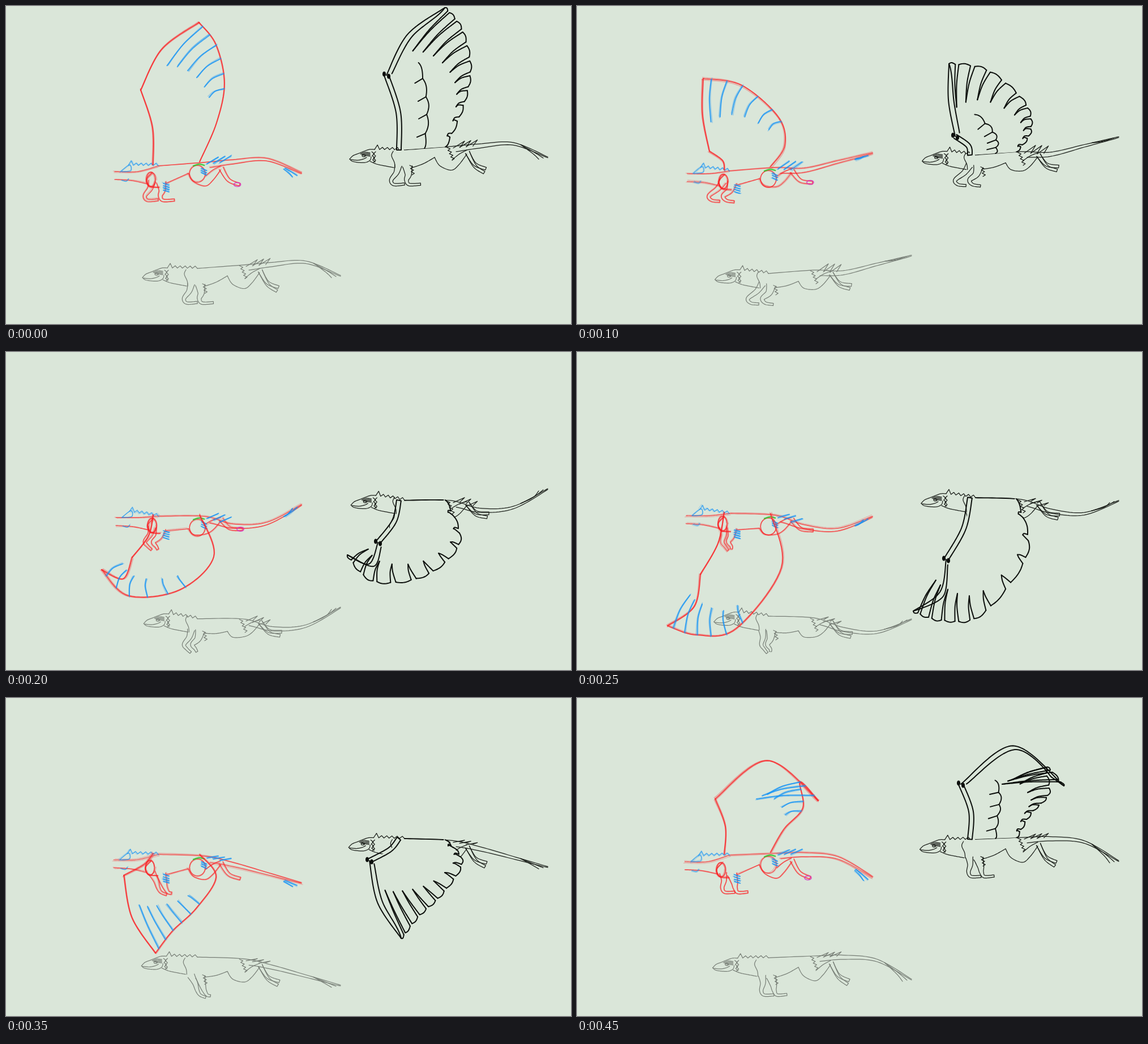
These frames come from a looping animation (998 by 561 pixels, 500 ms). An HTML page with a canvas:

```html
<!DOCTYPE html>
<html lang="en">
<head>
<meta charset="utf-8">
<title>Flight cycle</title>
<style>
html, body { margin: 0; width: 100%; height: 100%; overflow: hidden; background: #dae6d9; }
canvas { display: block; }
</style>
</head>
<body>
<canvas id="stage" width="998" height="561"></canvas>
<script>
const ctx = document.getElementById('stage').getContext('2d');
const PAPER = '#dae6d9', INK = '#0b0e0b', RED = '#fa1f24', BLUE = '#1593f5';
const STEP = 50, COUNT = 10, SAMPLES = 48;

// ---- geometry ----
const mix = (a, b, t) => Array.isArray(a) ? a.map((v, i) => mix(v, b[i], t)) : a + (b - a) * t;
const add = ([x, y], dx, dy) => [x + dx, y + dy];
const shift = (list, dx, dy) => list.map(s => s.map(p => add(p, dx, dy)));
const toward = (p, q, d) => mix(p, q, d / (Math.hypot(q[0] - p[0], q[1] - p[1]) || 1));

function smooth(...p) {
  const at = i => p[Math.max(0, Math.min(p.length - 1, i))];
  return Array.from({ length: SAMPLES + 1 }, (_, k) => {
    const u = k / SAMPLES * (p.length - 1), i = Math.min(p.length - 2, Math.floor(u)), t = u - i;
    return [0, 1].map(c => {
      const [a, b, d, e] = [-1, 0, 1, 2].map(n => at(i + n)[c]);
      return b + t / 2 * (d - a + t * (2 * a - 5 * b + 4 * d - e + t * (3 * (b - d) + e - a)));
    });
  });
}
function along(path, u) {
  const k = Math.max(0, Math.min(1, u)) * SAMPLES, i = Math.min(SAMPLES - 1, Math.floor(k));
  return mix(path[i], path[i + 1], k - i);
}
const part = (path, from, to, n = 10) =>
  Array.from({ length: n + 1 }, (_, k) => along(path, mix(from, to, k / n)));

// Outline of a limb that narrows from one width to another
function tube(path, wide, narrow) {
  const side = sign => path.map(([x, y], k) => {
    const a = path[Math.max(0, k - 1)], b = path[Math.min(SAMPLES, k + 1)];
    const dx = b[0] - a[0], dy = b[1] - a[1], len = Math.hypot(dx, dy) || 1;
    const w = sign / 2 * (narrow + (wide - narrow) * (1 - k / SAMPLES) ** 2);
    return [x - dy / len * w, y + dx / len * w];
  });
  return [...side(1), ...side(-1).reverse()];
}
function zigzag(from, to, n, size) {
  return Array.from({ length: n + 1 }, (_, i) => add(mix(from, to, i / n), i % 2 * size, 0));
}

// ---- rig: every joint sways once per loop, later joints lag behind ----
function bodyRig(frame) {
  const sway = (mid, amp, peak) => mid + amp * Math.cos((frame - peak) / COUNT * 2 * Math.PI);
  return {
    snout: [sway(607.5, 2.5, 2.8), sway(268.5, 5, 2)],
    spine: smooth([704, sway(255.5, 8.5, 2.8)], [785, sway(254, 8, 3.9)], [836, sway(260, 17, 4.7)],
      [896, sway(262, 24, 5.8)], [957, sway(264, 36, 7.6)]),
    belly: [718, sway(285.5, 2.5, 2.8)],
    crotch: [757, sway(275, 9, 4.2)],
    knee: [787, sway(291.5, 2, 5)],
    ankle: [814, sway(266, 5, 4.5)],
    toe: [sway(850, 3, 4), sway(287, 4, 7.5)],
    near: [[709, 283], [sway(709, 5, 8), 297], [sway(705, 13, 7.8), 307], [sway(720, 17, 8.8), sway(317, 3, 4.2)]],
    far: [[693, 281], [sway(692, 8, 7), 294], [sway(686, 18, 7), 307], [sway(703, 17, 7.6), sway(318, 4, 5)]],
    lift: sway(.65, .6, 1.5)
  };
}

// Wing keys: bow of the leading edge, wrist, tip, three points of the trailing edge
const flap = {
  0: [.12, [672, 122], [775, 3], [805, 42], [820, 110], [806, 180]],
  1: [.1, [664, 163], [715, 28], [772, 66], [814, 130], [806, 190]],
  2: [.05, [668, 230], [657, 102], [725, 114], [790, 170], [801, 220]],
  4: [.5, [657, 336], [603, 358], [650, 404], [740, 394], [801, 335]],
  5: [.2, [652, 366], [594, 457], [645, 473], [715, 462], [795, 355]],
  7: [-.1, [642, 287], [698, 424], [728, 385], [770, 345], [805, 290]],
  9: [.38, [678, 152], [860, 155], [828, 122], [833, 168], [800, 205]]
};
function wingRig(frame, spine) {
  const key = flap[frame] || mix(flap[frame - 1], flap[frame + 1], .5);
  const [bow, wrist, tip, ...rim] = key;
  const shoulder = add(spine[0], -10, 0), rear = along(spine, .22);
  const arm = smooth(wrist, add(mix(wrist, shoulder, .5), 10, 0), shoulder);
  const [dx, dy] = [tip[0] - wrist[0], tip[1] - wrist[1]];
  const lead = smooth(wrist, add(mix(wrist, tip, .5), bow * dy, -bow * dx), tip);
  const edge = smooth(tip, ...rim, rear);
  const notches = Array.from({ length: 10 }, (_, k) => {
    const u = .07 + k * .093;
    return { u, apex: mix(along(edge, u), along(arm, u), .6 * (1 - u) ** 1.8 + .06) };
  });
  return { wrist, arm, lead, edge, notches, raised: wrist[1] < shoulder[1] };
}

// ---- drawing ----
function trace(points) {
  ctx.beginPath();
  points.forEach(p => ctx.lineTo(...p));
}
function draw(list, color, width, alpha = 1) {
  ctx.strokeStyle = color;
  ctx.lineWidth = width;
  ctx.globalAlpha = alpha;
  for (const points of list) {
    trace(points);
    ctx.stroke();
  }
  ctx.globalAlpha = 1;
}
function at(dx, dy, paint) {
  ctx.save();
  ctx.translate(dx, dy);
  paint();
  ctx.restore();
}
const oval = (x, y, rx, ry) =>
  Array.from({ length: 25 }, (_, i) => [x + rx * Math.cos(i * Math.PI / 12), y + ry * Math.sin(i * Math.PI / 12)]);

let seed = 1;
const random = () => (seed = seed * 16807 % 2147483647) / 2147483647;
function rough(list, color, width, alpha) {
  draw(list, color, width, alpha);
  for (let pass = 0; pass < 2; pass++) {
    for (const s of list) {
      const [a, b] = [random() * 5 - 2.5, random() * 5 - 2.5];
      draw([s.map((p, i) => add(p, mix(a, b, i / s.length), mix(b, -a, i / s.length)))], color, width * .8, alpha * .4);
    }
  }
}

const tailUnder = spine => spine.slice(14).map(([x, y], i) => [x, y + 10 - i * .25]);
const tailTip = spine => [1, 2].map(k =>
  smooth(along(spine, .8), add(along(spine, .9), -3 * k, 2 * k), add(spine[SAMPLES], -8 * k, 2 * k)));
const tufts = (spine, lift) => [.27, .32, .38].map(u => {
  const p = along(spine, u);
  return [add(p, 0, 3), add(p, 20, -9 * lift), add(p, 12, 2)];
});
function legs({ near, far, crotch, knee, ankle, toe }) {
  const front = ([root, elbow, wrist, paw], wide) =>
    tube(smooth(root, elbow, wrist, add(wrist, 5, 8), paw), wide, 4);
  const foot = (dx, dy) => tube(smooth(add(ankle, 1, -3), add(mix(ankle, toe, .45), -1, 6 + dy / 2), add(toe, dx, dy)), 8, 5);
  return {
    front: [front(near, 17), front(far, 13)],
    hind: [
      smooth(crotch, add(mix(crotch, knee, .35), -1, 7), knee, add(mix(knee, ankle, .5), 0, 4), ankle),
      smooth(add(knee, 1, -18), add(mix(knee, ankle, .5), 0, -14), add(ankle, 0, -7)),
      foot(0, 0), foot(-3, 7)
    ]
  };
}
function headLines([x, y], nape) {
  const line = (...p) => smooth(...p.map(q => add(q, x, y)));
  const spikes = [add([44, -17], x, y)];
  for (let k = 0; k < 6; k++) {
    const p = mix(spikes[0], nape, (k + .35) / 6), q = mix(spikes[0], nape, (k + 1) / 6);
    spikes.push(add(p, 2, k ? -4 : -8), q);
  }
  return [
    spikes,
    line([0, 0], [6, -6], [16, -10], [26, -14], [35, -17], [44, -17]),
    line([0, 0], [5, 4], [16, 6], [28, 6], [36, 2], [38, -4]),
    line([2, 1], [14, 2], [24, 0], [30, -3]),
    line([36, 4], [48, 9], [62, 12], [78, 15]),
    line([77, -14], [74, -6], [79, 6], [80, 15]),
    zigzag(add([39, -13], x, y), add([41, 5], x, y), 5, 4),
    zigzag(add([46, -13], x, y), add([46, 6], x, y), 5, -4),
    oval(x + 25, y - 6, 3, 2),
    ...[0, 1, 2, 3].map(k => line([19 + k * 2, -9 + k], [27 + k, -12 + k * 2], [36, -11 + k * 2]))
  ];
}

function creature(rig, color, width) {
  const { snout, spine, belly, crotch, lift } = rig, { front, hind } = legs(rig);
  const hip = along(spine, .24);
  draw([
    ...headLines(snout, spine[0]), spine, tailUnder(spine), ...tailTip(spine), ...tufts(spine, lift),
    smooth(belly, add(mix(belly, crotch, .5), 0, 2), crotch), ...front, ...hind,
    zigzag(add(hip, -4, 1), add(hip, 6, 24), 8, 5), zigzag(add(belly, -5, -4), add(belly, -1, 13), 6, 5)
  ], color, width);
}

function inkedWing({ wrist, arm, lead, edge, notches, raised }, spine) {
  ctx.fillStyle = PAPER;
  trace([...[...arm].reverse(), ...lead, ...edge]);
  ctx.fill();
  const center = along(edge, .4), gap = .012;
  const quill = lead.map((p, k) => toward(p, center, 10 * (1 - (k / SAMPLES) ** 4)));
  const blades = notches.flatMap(({ u, apex }) => [-gap, gap].map(d => {
    const end = along(edge, u + d);
    return smooth(apex, add(mix(apex, end, .5), -2, -2), end);
  }));
  const scallops = [{ u: -gap }, ...notches].map(({ u }, k) => {
    const to = k < notches.length ? notches[k].u - gap : 1;
    return part(edge, u + gap, to).map((p, i) => toward(p, wrist, -2.5 * Math.sin(i / 10 * Math.PI)));
  });
  draw([tube(arm, 8, 8), lead, quill, ...blades, ...scallops], INK, 2);
  if (raised) {
    const covert = arm.map((p, k) => mix(p, along(edge, .35 + .65 * k / SAMPLES), .4 + .15 * (k / SAMPLES) ** 3));
    const bumps = [0, 1, 2, 3, 4].map(k =>
      part(covert, k / 5, (k + 1) / 5).map((p, i) => toward(p, along(arm, .5), -4 * Math.sin(i / 10 * Math.PI))));
    const ticks = [1, 2, 3, 4].map(k => [along(covert, k / 5), toward(along(covert, k / 5), along(arm, k / 5 + .1), 16)]);
    draw([...bumps, ...ticks], INK, 1.9);
  } else {
    draw([spine.slice(0, 11)], INK, 1.9);
  }
  ctx.fillStyle = INK;
  for (const x of [-4, 4]) {
    trace(oval(wrist[0] + x, wrist[1] + x / 2, 3, 4.5));
    ctx.fill();
  }
}

function construction(rig) {
  const { snout, spine, belly, crotch, toe, lift } = rig, { front, hind } = legs(rig);
  const [sx, sy] = snout, [hx, hy] = along(spine, .24);
  rough([
    smooth([sx + 20, sy - 6], [sx + 60, sy - 6], spine[0]),
    smooth([sx + 20, sy + 8], [sx + 50, sy + 10], [sx + 78, sy + 16]),
    spine, tailUnder(spine), smooth(belly, crotch)
  ], RED, 1.7, .6);
  rough([...front, ...hind.slice(0, 3), oval(hx - 9, hy + 20, 14, 15)], RED, 1.6, .65);
  rough([oval(sx + 84, sy + 8, 8, 13), smooth([sx + 86, sy - 4], [sx + 76, sy + 8], [sx + 82, sy + 20], [sx + 98, sy + 22])], RED, 2, .7);
  const crest = headLines(snout, spine[0])[0];
  const ticks = (x, y, n, dx, dy) => Array.from({ length: n }, (_, k) => [[x, y + k * 4], [x + dx, y + k * 4 + dy]]);
  rough([crest, smooth([sx + 30, sy - 6], [sx + 46, sy - 18], [sx + 48, sy - 8], [sx + 32, sy - 6]),
    smooth([sx + 32, sy + 9], [sx + 40, sy + 11], [sx + 44, sy + 7])], BLUE, 1.4, .65);
  rough([...ticks(belly[0] - 5, belly[1], 4, 10, 3), ...ticks(hx - 2, hy + 10, 3, 9, 4),
    ...tufts(spine, lift).map(s => s.slice(0, 2)), ...shift(tailTip(spine).map(s => s.slice(18)), 0, 3)], BLUE, 1.9, .8);
  draw([smooth([hx - 16, hy + 6], [hx - 6, hy + 3], [hx + 3, hy + 5])], '#27c727', 2.6, .8);
  return toe;
}

function roughWing({ arm, lead, edge, notches }) {
  rough([arm, lead], RED, 2.2, .75);
  rough([edge], RED, 2, .75);
  rough(notches.slice(0, 6).map(({ u, apex }) => {
    const end = along(edge, u);
    return smooth(apex, add(mix(apex, end, .5), -3, -3), end);
  }), BLUE, 2.1, .75);
}

function render(frame) {
  seed = 71 + frame * 977;
  ctx.fillStyle = PAPER;
  ctx.fillRect(0, 0, 998, 561);
  const rig = bodyRig(frame), wing = wingRig(frame, rig.spine);
  at(-366, 209, () => creature(rig, '#767d75', 1.2));
  at(-435, 28, () => {
    const [x, y] = construction(rig);
    if (rig.lift > .4) draw([oval(x - 4, y, 6, 3.5)], '#d42fc4', 1.7, .8);
  });
  at(-434, 26, () => roughWing(wing));
  creature(rig, '#1a1e19', 1.25);
  inkedWing(wing, rig.spine);
}

ctx.lineCap = ctx.lineJoin = 'round';
const start = performance.now();
let shown = -1;
function tick() {
  const frame = Math.floor((performance.now() - start) / STEP) % COUNT;
  if (frame !== shown) render(shown = frame);
  requestAnimationFrame(tick);
}
tick();
</script>
</body>
</html>
```
